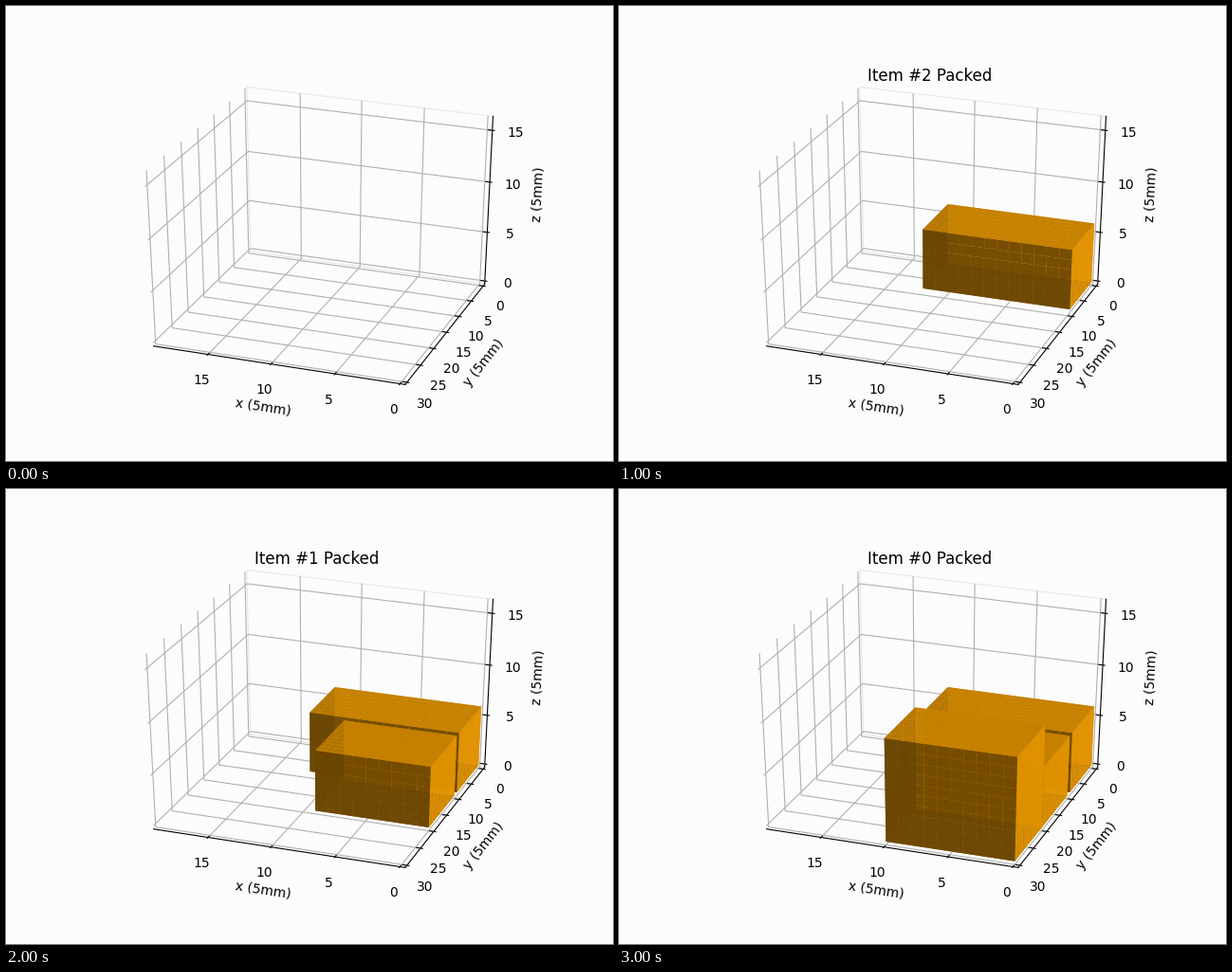
Recreate the animation shown at these times as a matplotlib script. Size 640 by 480 pixels, loop 4000 ms.

```python
import itertools

import matplotlib.pyplot as plt
import numpy as np
from matplotlib.animation import FuncAnimation
from matplotlib.collections import LineCollection, PolyCollection

WIDTH, HEIGHT, DPI = 640, 480, 100
BACKGROUND = "#fcfcfc"
GRID = "#b0b0b0"
PANE_EDGE = "#e8e8e8"
ORANGE = np.array([1.0, 165 / 255, 0.0])
ALPHA = 0.9

SIZE = np.array([19, 30, 16])          # container, in cells
ELEV, AZIM, DIST = np.radians(30), np.radians(110), 10
PAD = 0.5 + 1 / 48                     # half width of the padded unit cube
POINT = 4 / (72 * (4.96 + 3.696))      # cube length of one text point
LIGHT = np.array([-2, -2, 1]) / 3

# label, position of the axis on the cube (0 marks its own direction)
AXES = [
    ("x (5mm)", (0, 1, -1)),
    ("y (5mm)", (-1, 0, -1)),
    ("z (5mm)", (-1, -1, 0)),
]

# number, low corner, high corner
ITEMS = [
    (2, (0, 0, 0), (12, 9, 6)),
    (1, (0, 10, 0), (9, 20, 6)),
    (0, (0, 20, 0), (10, 30, 10)),
]

RIGHT = np.array([-np.sin(AZIM), np.cos(AZIM), 0])
TOWARD = np.array([np.cos(ELEV) * np.cos(AZIM),
                   np.cos(ELEV) * np.sin(AZIM),
                   np.sin(ELEV)])
UP = np.cross(TOWARD, RIGHT)


def depth(points):
    return DIST - np.asarray(points) @ TOWARD


def project(points):
    """Map unit cube coordinates, centred on zero, to stage pixels."""
    points = np.asarray(points, float)
    far = depth(points)
    x = 80 + (points @ RIGHT / far + 0.095) / 0.185 * 496
    y = 427.2 - (points @ UP / far + 0.095) / 0.185 * 369.6
    return np.stack([x, y], axis=-1)


def draw_line(points, color, zorder, **style):
    ax.plot(*project(points).T, color=color, lw=0.8, zorder=zorder, **style)


def draw_axis(index, label, signs):
    signs = np.array(signs)
    first, second = [i for i in range(3) if i != index]
    zorder = 2 + index

    def on_edge(value, offset=0.0):
        point = signs * (PAD + offset)
        point[index] = value
        return point

    ends = [on_edge(-PAD), on_edge(PAD)]
    draw_line(ends, "black", zorder)

    dx, dy = np.subtract(*project(ends))
    angle = np.degrees(np.arctan2(-dy, dx))
    angle = (angle + 90) % 180 - 90
    ax.text(*project(on_edge(0, 25 * POINT)), label, rotation=angle,
            rotation_mode="anchor", ha="center", va="center", fontsize=10,
            zorder=zorder)

    grid = []
    for tick in range(0, SIZE[index] + 1, 5):
        value = tick / SIZE[index] - 0.5
        start = on_edge(value)
        corner = start.copy()
        corner[first] *= -1
        end = corner.copy()
        end[second] *= -1
        grid.append(project([start, corner, end]))

        outer, inner = start.copy(), start.copy()
        outer[first] += signs[first] * 0.1 / 12
        inner[first] -= signs[first] * 0.2 / 12
        draw_line([outer, inner], "black", zorder + 0.2)
        ax.text(*project(on_edge(value, 11.5 * POINT)), str(tick),
                ha="center", va="top", fontsize=10, zorder=zorder + 0.2)

    ax.add_collection(LineCollection(grid, colors=GRID, linewidths=0.8,
                                     zorder=zorder + 0.1), autolim=False)


def box_faces(low, high):
    """Yield the unit squares on the surface of a box with their colours."""
    for index, side in itertools.product(range(3), (-1, 1)):
        first, second = [i for i in range(3) if i != index]
        normal = np.zeros(3)
        normal[index] = side
        shade = 0.3 + 0.7 * (normal @ LIGHT + 1) / 2
        for a, b in itertools.product(range(low[first], high[first]),
                                      range(low[second], high[second])):
            face = np.empty((4, 3))
            face[:, index] = high[index] if side > 0 else low[index]
            face[:, first] = [a, a + 1, a + 1, a]
            face[:, second] = [b, b, b + 1, b + 1]
            yield face / SIZE - 0.5, (*(ORANGE * shade), ALPHA)


def draw_box(low, high, zorder):
    faces = sorted(box_faces(low, high), key=lambda f: -depth(f[0]).mean())
    quads, colors = zip(*faces)
    box = PolyCollection([project(quad) for quad in quads], facecolors=colors,
                         edgecolors="none", zorder=zorder)
    ax.add_collection(box, autolim=False)
    return box


fig = plt.figure(figsize=(WIDTH / DPI, HEIGHT / DPI), dpi=DPI,
                 facecolor=BACKGROUND)
ax = fig.add_axes([0, 0, 1, 1])
ax.set_xlim(0, WIDTH)
ax.set_ylim(HEIGHT, 0)
ax.axis("off")

back_wall = np.array([(-1, -1, -1), (1, -1, -1), (1, -1, 1), (-1, -1, 1)])
draw_line(back_wall * PAD, PANE_EDGE, 1, solid_capstyle="butt")
for axis_index, (axis_label, axis_signs) in enumerate(AXES):
    draw_axis(axis_index, axis_label, axis_signs)

boxes = [draw_box(low, high, 10 + i) for i, (_, low, high) in enumerate(ITEMS)]
title = ax.text(328, 78.83, "", ha="center", va="baseline", fontsize=12,
                zorder=20)


def update(step):
    for i, box in enumerate(boxes):
        box.set_visible(i < step)
    title.set_text(f"Item #{ITEMS[step - 1][0]} Packed" if step else "")
    return [*boxes, title]


animation = FuncAnimation(fig, update, frames=len(ITEMS) + 1, interval=1000,
                          repeat=True, repeat_delay=0)
plt.show()
```
